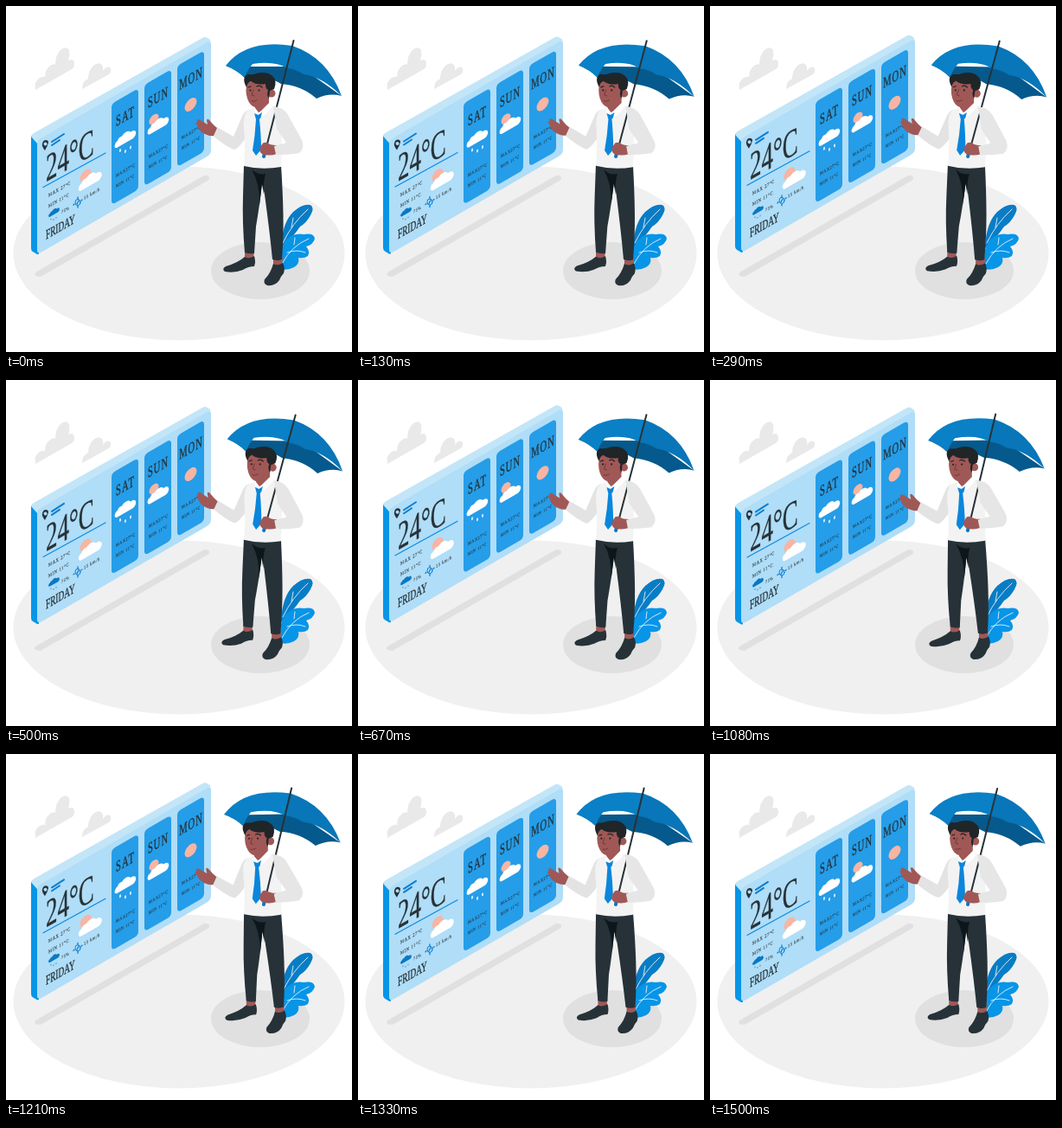
Recreate the animation shown at these times as an HTML page. Size 400 by 400 pixels, loop 1.54 s.

```html
<!DOCTYPE html>
<html lang="en">
<head>
<meta charset="utf-8">
<title>Weather forecast</title>
<style>
  html, body { margin: 0; width: 100%; height: 100%; overflow: hidden; background: #fff; }
  svg { display: block; width: 100%; height: 100%; }
  text { font-family: "Liberation Serif", serif; fill: #263238; stroke: #263238; stroke-width: .35px; }
  .day { text-anchor: middle; letter-spacing: 1.8px; }
  .small { letter-spacing: .8px; stroke-width: .1px; }
  .line { fill: none; stroke-linecap: round; }
  .skin { fill: #a05856; }
  .dark { fill: #263238; }
</style>
</head>
<body>
<svg viewBox="0 0 400 400">
  <defs>
    <path id="cloud" d="M3.5 0A4 4 0 0 1 4.5-7.6A4 4 0 0 1 9.5-10A6 6 0 0 1 19.5-9A4.6 4.6 0 0 1 22.5 0Z"/>
  </defs>

  <g fill="#e9e9e9">
    <path d="M34 97Q32 87 39 83Q43 81 45 82Q45 74 50 70Q54 66 57 68Q57 56 64 50Q70 46 73 51Q74 56 72 63Q79 60 79 67Q79 71 76 73Z"/>
    <path d="M88 96Q88 87 95 84Q95 75 101 69Q107 64 111 68Q113 71 112 75Q117 68 121 72Q122 76 119 79Z"/>
  </g>
  <ellipse cx="200" cy="286" rx="191.500" ry="100.500" fill="#f0f0f0"/>
  <path d="M34 308L229 196Q232 195 235 198Q236 200 233 202L40 313Q36 313 33 311Z" fill="#e0e0e0"/>
  <ellipse cx="294" cy="306" rx="57" ry="33" fill="#e0e0e0"/>

  <g id="panel">
    <path d="M29 150L38 154V287L36 287L31 284Q29 283 29 280Z" fill="#0795e8"/>
    <path d="M29 151Q29 149 32 147L227 37Q230 35 233 37L236 39L237 44L37 160Z" fill="#c3e5f8"/>
    <rect width="201" height="132" rx="5" transform="translate(36 155.500) skewY(-30)" fill="#b0ddf7"/>
    <g id="items"></g>
    <path class="line" d="M43 209.500L115 170" stroke="#0a8be2" stroke-width="1.200"/>
    <path class="line" d="M53 157L67 148M53 161L62 155" stroke="#0a7fd2" stroke-width="2"/>
    <path class="dark" fill-rule="evenodd" d="M45 167Q41 162 42 159Q43 155 46 155Q49 155 49 158Q48 162 45 167ZM45.500 157.500A2 2 0 1 0 45.600 157.500Z"/>
    <g class="line" stroke="#0a7fd2">
      <ellipse cx="83" cy="227" rx="3" ry="3.600"/>
      <path d="M83 221V223M83 231V233M78 230L79 229M87 225L88 224M82 229L84 225" stroke-width="1.300"/>
    </g>
  </g>

  <path d="M318 276Q320 250 332 238Q343 228 352 230Q357 233 352 242Q347 251 340 255Q332 267 318 280Z" fill="#087dc6"/>
  <path d="M318 304Q314 282 324 270Q333 262 344 264Q356 262 357 269Q355 276 347 278Q352 284 349 289Q345 292 338 291Q340 298 333 302Q325 306 318 304Z" fill="#0795e8"/>
  <path class="line" d="M320 274Q331 251 349 235M330 256L332 245M319 298Q330 277 350 269M325 285Q336 281 346 285M333 276L334 268" stroke="#fff" stroke-width=".8"/>

  <g id="man">
    <path class="skin" d="M276 282H287L286 293L276 294ZM309 290H320L319 301L309 302Z"/>
    <path class="dark" d="M276 290Q281 293 287 289Q289 296 287 301Q280 301 274 305Q264 309 253 307Q249 304 254 301Q268 297 276 290Z"/>
    <path class="dark" d="M309 298Q314 301 320 297Q323 303 321 309Q318 312 316 317Q311 324 302 323Q297 321 299 316Q306 309 309 298Z"/>
    <path class="dark" d="M275 184H318Q320 215 320.500 240Q321 268 319 293Q314 295 308 293Q305 262 299 218L296 205Q293 232 289 255L287 286Q281 287 276 285Q273 250 274 220Z"/>
    <path d="M284 189Q291 196 300 194Q297 204 298 218L296 205L293 230Q294 206 284 189Z" fill="#0d161a"/>

    <path d="M254 69Q267 74 276 83Q300 79 318 90Q342 92 359 107Q374 100 388 104L340 70H270Z" fill="#06598c"/>
    <path d="M331 46Q278 38 254 69Q267 74 276 83Q279 74 285 67Q311 63 325 72Z" fill="#0a80c6"/>
    <path d="M331 46Q372 60 388 104Q366 82 344 79Q335 73 325 72Z" fill="#0876b8"/>

    <path d="M281 120Q275 121 272 130L263 151L244 140L239 150Q255 163 264 166Q270 164 280 148Z" fill="#e3e3e3"/>
    <path class="skin" d="M244 141Q239 137 236 133Q233 129 232 132L233 137L223 131Q220 131 221 134Q218 135 221 138Q224 146 230 148Q236 151 240 150Z"/>
    <path d="M279 121L289 117L305 114L316 119Q320 145 318 186Q296 190 275 185Q277 163 275 140Q274 126 279 121Z" fill="#f3f3f3"/>
    <path class="skin" d="M288 112L304 104V113Q301 119 292 123L288 118Z"/>
    <path d="M287 117L292 124L304 112L308 116Q302 124 296 128L291 125L287 127Z" fill="#fff"/>
    <path d="M287 124L291.500 126L296 123L294.500 129L293 131Q295 150 295 166L289 173L285 167Q288 150 289 131Z" fill="#0a86dc"/>

    <circle class="skin" cx="307" cy="101" r="4.500"/>
    <path class="skin" d="M279 87Q276 98 279 107Q282 116 289 117.500Q299 117 304 106L308 88Z"/>
    <path d="M278 94Q272 83 279 79Q285 80 289 78Q302 75 308 81Q314 86 310 96L305 98L304 107Q301 103 303 97Q300 96 300 90Q290 92 283 87Q279 88 278 94Z" fill="#202528"/>
    <path class="line" d="M280 94L283 93M290 93Q293 91 296 94" stroke="#202528" stroke-width="1.200"/>
    <path class="line" d="M286 97L284 103L287 104M284 110Q287 111 290 109" stroke="#6f3437" stroke-width=".9"/>
    <g fill="#202528"><circle cx="282.500" cy="97.500" r="1.100"/><circle cx="292.500" cy="97.500" r="1.100"/></g>

    <path class="line" d="M332.500 40L299 171" stroke="#263238" stroke-width="2"/>
    <path class="line" d="M299 170L298 174" stroke="#0a77c6" stroke-width="4"/>
    <path class="skin" d="M313 161Q305 161 302 158Q297 157 296 160L294 163Q292 168 296 171Q304 174 313 171Z"/>
    <path d="M309 116Q321 117 326 126L342 155Q346 164 339 170Q327 172 312 172L310 162L324 158L313 142Z" fill="#e6e6e6"/>
  </g>
</svg>
<script>
const LOOP = 1540;
const $ = id => document.getElementById(id);
const iso = (x, y, sx = 1, sy = sx) => `transform="translate(${x} ${y}) skewY(-30) scale(${sx} ${sy})"`;
const title = (s, x, y, size, kind = '') => `<text class="${kind}" ${iso(x, y, .6, 1)} font-size="${size}">${s}</text>`;
const note = (s, x, y, size) => `<text class="small" ${iso(x, y, .78, 1)} font-size="${size}">${s}</text>`;
const cloud = (x, y, scale = 1, fill = '#fff') => `<use href="#cloud" ${iso(x, y, scale)} fill="${fill}"/>`;
const sun = (x, y, r) => `<circle r="${r}" ${iso(x, y)} fill="#f7b5a2"/>`;
const rain = (x, y, scale, color) =>
  `<path class="line" ${iso(x, y, scale)} d="M0 0v2M6 4.500v2M12 3.500v2" stroke="${color}" stroke-width="1.600"/>`;

const columns = ['SAT', 'SUN', 'MON'].map((day, i) => {
  const x = 122 + 38 * i, y = 113 - 21.9 * i;
  return `<rect width="31" height="117" rx="4.500" ${iso(x, y)} fill="#259de8"/>`
    + title(day, x + 16, y + 20, 17.5, 'day')
    + note('MAX27°C', x + 5, y + 85, 5.3)
    + note('MIN 11°C', x + 5, y + 97, 5.1);
});

$('items').innerHTML = columns.join('')
  + cloud(124.5, 166) + rain(132, 166, 1, '#fff')
  + sun(171, 131, 5.5) + cloud(162.5, 150.5)
  + sun(213.5, 114, 7)
  + title('24°C', 46, 203.5, 45)
  + sun(92, 196, 6.5) + cloud(82.5, 216, 1.1)
  + note('MAX 27°C', 49, 221, 5.8)
  + note('MIN 11°C', 49, 233.5, 5.8)
  + note('75%', 64, 240, 5.2)
  + note('15 km/h', 90, 224, 5.6)
  + cloud(48.5, 245, .52, '#0a78c4') + rain(52, 246, .5, '#0a78c4')
  + title('FRIDAY', 46, 270, 15.5);

function draw(now) {
  const phase = now % LOOP / LOOP * 2 * Math.PI;
  $('panel').setAttribute('transform', `translate(0 ${-3.5 * (1 - Math.cos(phase))})`);
  $('man').setAttribute('transform', `rotate(${Math.sin(phase)} 297 180)`);
  requestAnimationFrame(draw);
}
draw(performance.now());
</script>
</body>
</html>
```
